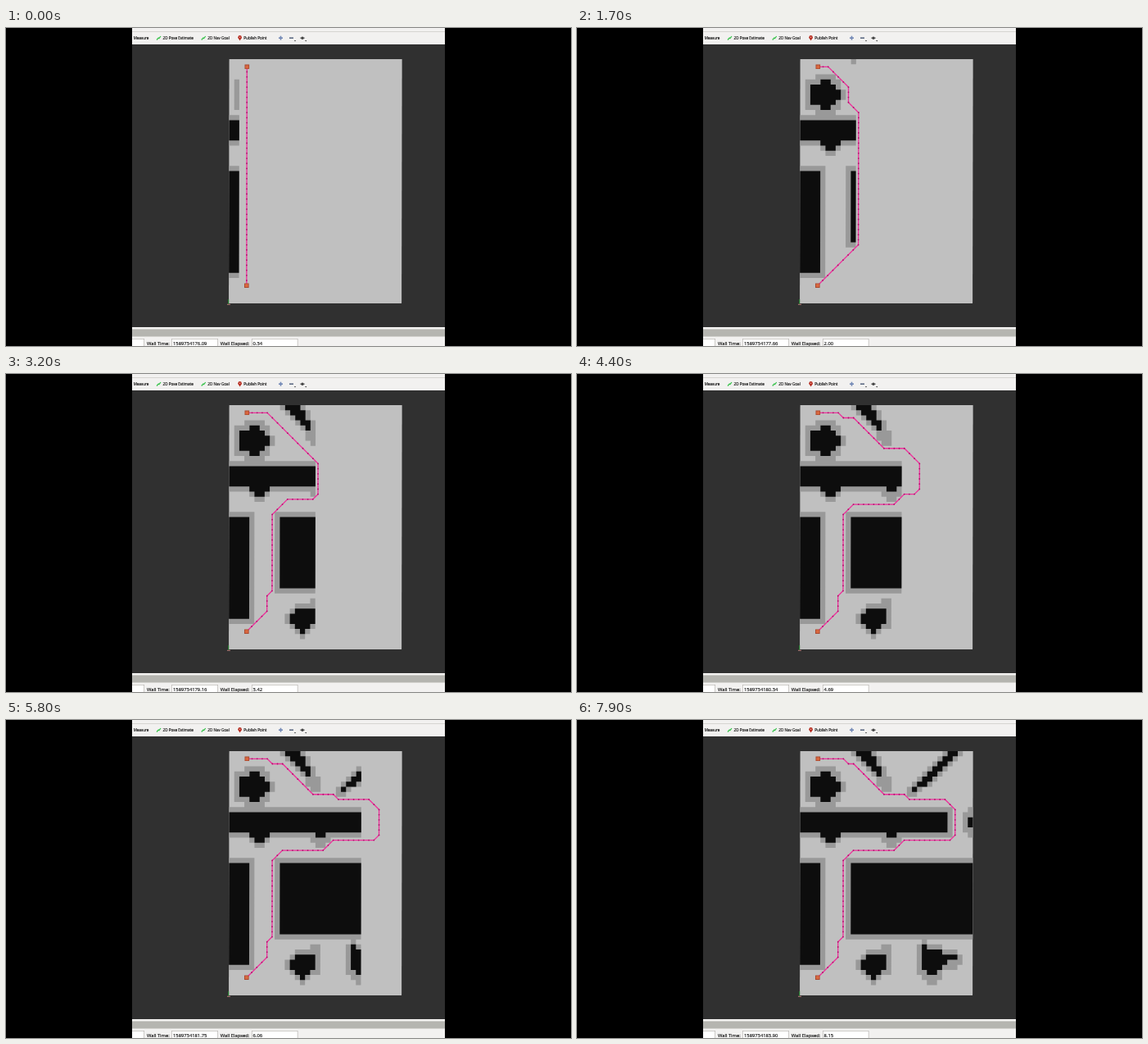
These frames come from a looping animation (690x388 px, 8000 ms). An HTML page with a canvas:

```html
<!DOCTYPE html>
<html lang="en">
<head>
<meta charset="utf-8">
<title>Path replanning on a grid map</title>
<style>
html, body { margin: 0; width: 100%; height: 100%; overflow: hidden; background: #000; }
canvas { display: block; width: 690px; height: 388px; }
</style>
</head>
<body>
<canvas id="stage" width="690" height="388"></canvas>
<script>
const g = document.getElementById('stage').getContext('2d');
const LOOP = 8000, CELL = 6.207, COLS = 34, ROWS = 48;

// Clock readings: time in s, wall elapsed, wall time
const clock = [
  [0, 0.34, 176.09], [1.7, 2, 177.66], [3.2, 3.42, 179.16], [4.4, 4.69, 180.34],
  [5.1, 5.33, 181.05], [6.7, 7, 182.65], [7.9, 8.15, 183.9]
];
// Each scan uncovers three more columns
const scans = [500, 1000, 1500, 2100, 2900, 3900, 4700, 5400, 5900, 6500, 7100];

// Rectangles in cells: column, row, width, height
const grey = [
  [0, 21, 5, 22], [0, 11, 30, 6], [9, 21, 25, 16],
  [3, 3, 4, 8], [1, 4, 7, 6], [8, 6, 1, 2],
  [4, 17, 4, 1], [5, 18, 2, 1], [16, 17, 4, 1], [17, 18, 2, 1],
  [10, 0, 5, 1], [11, 1, 5, 1], [12, 2, 4, 1], [13, 3, 4, 1], [14, 4, 3, 1], [15, 5, 3, 2], [16, 7, 2, 1],
  [16, 38, 2, 1], [13, 39, 5, 1], [12, 40, 6, 4], [11, 41, 2, 2], [13, 44, 3, 1], [14, 45, 1, 1],
  [24, 37, 1, 1], [23, 38, 5, 6], [28, 39, 3, 4], [31, 40, 1, 2], [24, 44, 4, 1], [25, 45, 2, 1], [21, 8, 2, 1],
  [33, 11, 1, 6], [32, 12, 2, 4]
];
const black = [
  [0, 22, 4, 20], [0, 12, 29, 4], [10, 22, 24, 14],
  [4, 4, 2, 6], [2, 5, 5, 4], [7, 6, 1, 2],
  [4, 16, 4, 1], [5, 17, 2, 1], [17, 16, 2, 1],
  [11, 0, 3, 1], [12, 1, 3, 1], [13, 2, 2, 1], [14, 3, 2, 1], [15, 4, 1, 1],
  [13, 40, 4, 1], [12, 41, 5, 2], [13, 43, 3, 1], [14, 44, 1, 1],
  [24, 38, 1, 1], [24, 39, 4, 4], [28, 40, 3, 1], [28, 41, 1, 1], [25, 43, 2, 1],
  [33, 13, 1, 2]
];
for (let i = 0; i < 8; i++) {
  grey.push([28 - i, i, i < 7 ? 4 : 3, 1]);
  black.push([29 - i, i, i < 7 ? 2 : 1, 1]);
}

// Corner cells of the planned path when n columns are known
function route(n) {
  const a = [3, 1], z = [3, 44];
  const down = [[8, 21], [8, 36], [7, 37], [7, 40], z];
  if (n < 5) return [a, z];
  if (n < 8) return [a, [5, 3], [5, 42], z];
  if (n < 11) return [a, [5, 1], [8, 4], [8, 39], z];
  if (n < 14) return [a, [5, 1], [9, 5], [9, 8], [11, 10], [11, 36], z];
  if (n < 17) return [a, [7, 1], [14, 8], [14, 16], [13, 17], [12, 17], ...down];
  if (n < 20) return [a, [7, 1], [17, 11], [17, 17], [16, 18], [11, 18], ...down];
  const far = Math.min(n + 3, 30), k = n < 29 ? 7 : 8;
  const bend = far > 23 ? [[21, 9], [far - 2, 9]] : [];
  return [a, [k, 1], [k + 1, 2], [10, 2], [16, 8], [20, 8], ...bend, [far, 11], [far, 16],
    [far - 1, 17], [20, 17], [18, 19], [10, 19], ...down];
}

function box(x, y, w, h, color) {
  g.fillStyle = color;
  g.fillRect(x, y, w, h);
}

function line(points, color, width) {
  g.beginPath();
  points.forEach(([x, y]) => g.lineTo(x, y));
  g.strokeStyle = color;
  g.lineWidth = width;
  g.stroke();
}

function dot(x, y, r, color) {
  g.beginPath();
  g.arc(x, y, r, 0, 7);
  g.fillStyle = color;
  g.fill();
}

function label(text, x, y, size) {
  g.font = `${size}px "Open Sans", "Noto Sans", sans-serif`;
  g.fillStyle = '#111';
  g.fillText(text, x, y);
  g.strokeStyle = '#111';
  g.lineWidth = 0.15;
  g.strokeText(text, x, y);
}

function caret(x, y) {
  g.beginPath();
  g.moveTo(x - 1.2, y);
  g.lineTo(x + 1.2, y);
  g.lineTo(x, y + 1.5);
  g.fillStyle = '#444';
  g.fill();
}

function cells(list, n, color) {
  g.beginPath();
  for (const [c, r, w, h] of list) {
    const right = Math.min(c + w, n);
    if (right > c) g.rect(c * CELL, r * CELL, (right - c) * CELL, h * CELL);
  }
  g.fillStyle = color;
  g.fill();
}

function drawMap(n) {
  g.save();
  g.transform(1, 0, -0.0018, 1, 272.6, 38);
  box(0, 0, COLS * CELL, ROWS * CELL, '#c0c0c0');
  cells(grey, n, '#999');
  cells(black, n, '#0d0d0d');

  const mid = v => (v + 0.5) * CELL;
  const path = route(n);
  line(path.map(p => p.map(mid)), '#ee2f9b', 1.3);
  path.slice(1).forEach(([x, y], i) => {
    const [px, py] = path[i];
    const steps = Math.max(Math.abs(x - px), Math.abs(y - py));
    for (let s = 0; s < steps; s++)
      dot(mid(px + (x - px) * s / steps), mid(py + (y - py) * s / steps), 0.9, '#b0126c');
  });
  for (const [x, y] of [path[0], path[path.length - 1]]) {
    box(mid(x) - 2.8, mid(y) - 2.8, 5.6, 5.6, '#a84a32');
    box(mid(x) - 1.9, mid(y) - 1.9, 3.8, 3.8, '#d9683f');
  }
  g.restore();
  line([[271.7, 331], [271.7, 337]], '#1f8f2a', 0.9);
  line([[270, 337.3], [274, 337.3]], '#c98080', 0.9);
}

function drawToolbar() {
  box(154, 0, 382, 20, '#f2f1f0');
  box(154, 4, 382, 1, '#d6d4d1');
  label('Measure', 155.8, 13.8, 4.6);
  label('2D Pose Estimate', 191.5, 13.8, 4.6);
  label('2D Nav Goal', 246.3, 13.8, 4.6);
  label('Publish Point', 290.3, 13.8, 4.6);
  for (const x of [184, 238.7]) {
    line([[x, 14.5], [x + 2.2, 12], [x + 3, 12.6], [x + 5, 10]], '#36c24a', 1.2);
  }
  g.beginPath();
  g.moveTo(283.5, 12);
  g.lineTo(285.6, 15.6);
  g.lineTo(287.7, 12);
  g.fillStyle = '#b5281c';
  g.fill();
  dot(285.6, 11.2, 2.2, '#b5281c');
  dot(285.6, 11.2, 0.7, '#f2c0b8');
  line([[333, 12.2], [338, 12.2]], '#7187b5', 1.6);
  line([[335.5, 9.7], [335.5, 14.7]], '#7187b5', 1.6);
  line([[346, 12.2], [351, 12.2]], '#53617c', 1.5);
  line([[359, 12.2], [365, 12.2]], '#8b8b8b', 1.2);
  dot(362, 12.2, 1.7, '#444');
  caret(353, 15);
  caret(366.2, 15);
}

function drawStatus(t) {
  let i = 0;
  while (i < clock.length - 2 && t >= clock[i + 1][0]) i++;
  const a = clock[i], b = clock[i + 1], f = (t - a[0]) / (b[0] - a[0]);
  const read = k => a[k] + (b[k] - a[k]) * f;

  box(154, 365, 382, 23, '#f2f1f0');
  box(154, 367.5, 382, 9, '#b5b5b0');
  for (const [x, w] of [[150, 19], [202, 57], [300, 56.5]]) {
    box(x, 379, w, 10, '#b8b5b1');
    box(x + 0.7, 379.7, w - 1.4, 10, '#fff');
  }
  box(150, 365, 4, 23, '#000');
  label('Wall Time:', 172, 386.5, 5.8);
  label((1589734000 + read(2)).toFixed(2), 204, 386.5, 5.8);
  label('Wall Elapsed:', 261.8, 386.5, 5.8);
  label(read(1).toFixed(2), 301.6, 386.5, 5.8);
}

function draw(now) {
  const t = Math.floor(now % LOOP / 100) * 100;
  const n = Math.min(2 + 3 * scans.filter(s => t >= s).length, COLS);
  box(0, 0, 690, 388, '#000');
  box(154, 0, 382, 388, '#303030');
  drawMap(n);
  drawToolbar();
  drawStatus(t / 1000);
}

const start = performance.now();
function tick() {
  draw(performance.now() - start);
  requestAnimationFrame(tick);
}
tick();
</script>
</body>
</html>
```
